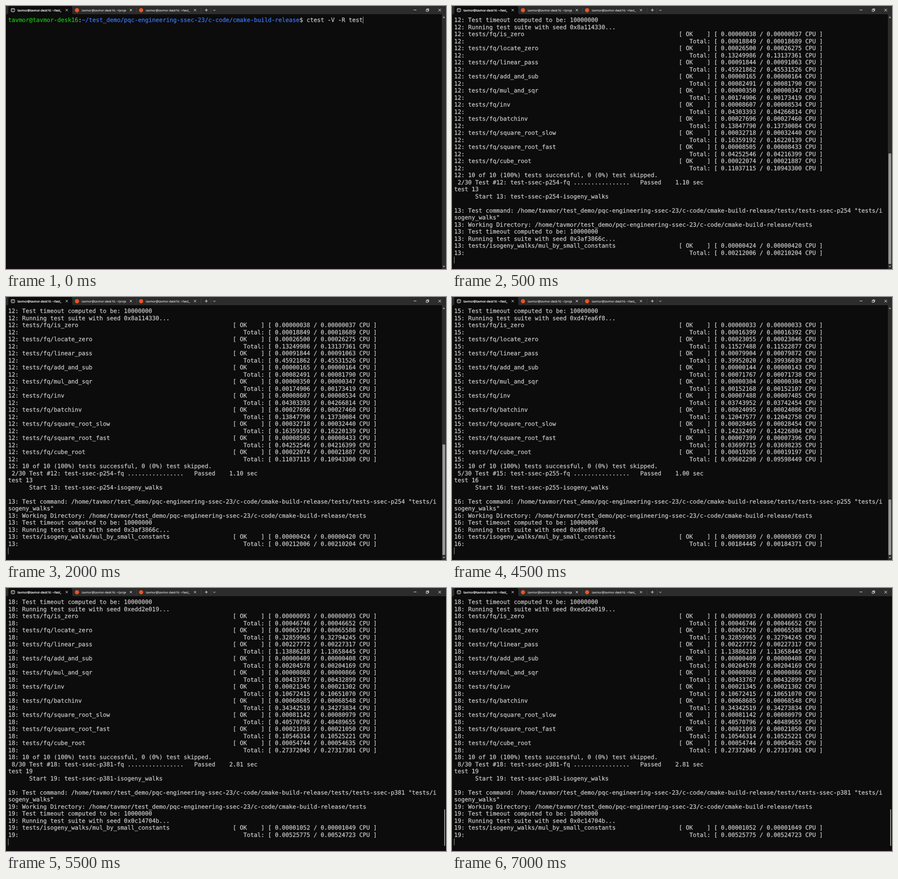
Recreate the animation shown at these times as an HTML page. Size 969 by 578 pixels, loop 8 s.

```html
<!DOCTYPE html>
<html lang="en">
<head>
<meta charset="utf-8">
<title>Terminal test run</title>
<style>
  html, body { margin: 0; width: 100%; height: 100%; overflow: hidden; background: #0c0c0c; }
  svg { position: absolute; left: 0; top: 0; }
  pre {
    position: absolute; left: 4.7px; top: 24px; margin: 0; color: #ccc;
    font: 12.855px/15.5px "DejaVu Sans Mono", monospace;
    text-rendering: geometricPrecision; font-variant-ligatures: none;
    -webkit-text-stroke: .25px;
  }
  .user { color: #16c60c; }
  .path { color: #3b78ff; }
  .label {
    position: absolute; top: 4px; width: 97px; overflow: hidden; white-space: nowrap;
    font: 6.5px/11px "Open Sans", sans-serif; color: #f2f2f2;
    text-rendering: geometricPrecision; -webkit-text-stroke: .1px;
  }
  .label.active { color: #fff; -webkit-text-stroke: .25px; }
  .line { fill: none; stroke: #f0f0f0; }
</style>
</head>
<body>
<svg width="969" height="578" viewBox="0 0 969 578">
  <rect width="969" height="18" fill="#2c2c2c"/>
  <path d="M2 18Q5 18 5 15V4Q5 0 9 0H142Q146 0 146 4V15Q146 18 149 18Z" fill="#0c0c0c"/>
  <rect y="575" width="969" height="3" fill="#130a10"/>
  <path d="M287.5 3V15M429.5 3V15M451.5 3V15" stroke="#414141"/>
  <rect x="11.4" y="5.4" width="7.6" height="7.4" rx="1.6" class="line"/>
  <path d="M11.5 7.3H19M13 9l1.4 1.1L13 11.2M15.6 11h2" class="line" stroke-width=".7"/>
  <circle cx="156.3" cy="9.3" r="4.6" fill="#e95420"/>
  <circle cx="297.5" cy="9.3" r="4.6" fill="#e95420"/>
  <path id="icons" class="line"/>
  <g id="scrollbar">
    <rect x="960" y="18" width="9" height="560" fill="#2c2c2c"/>
    <path d="M961.6 26.3L964.3 22.4L967 26.3ZM961.6 571L964.3 574.8L967 571Z" fill="#9a9a9a"/>
  </g>
  <rect id="thumb" rx="1.5" fill="#9a9a9a"/>
  <rect id="cursor" width="1" height="15" fill="#a8a8a8"/>
</svg>
<pre id="screen"></pre>
<script>
const $ = id => document.getElementById(id);
const user = 'tavmor', host = `${user}-desk16`;
const project = 'test_demo/pqc-engineering-ssec-23/c-code/cmake-build-release';
const repeats = 500;

// Seconds for all repeats of each test on the smallest prime.
const fieldTests = {
  is_zero: .00018849, locate_zero: .13249986, linear_pass: .45921862, add_and_sub: .00082491,
  mul_and_sqr: .00174906, inv: .04303393, batchinv: .1384779, square_root_slow: .16359192,
  square_root_fast: .04252546, cube_root: .11037115
};
const walkTime = .00212006;

// Times scale with the prime; cpu is the share of wall time spent on the processor.
const runs = [
  { start: 500, id: 12, prime: 'p254', scale: 1, cpu: .9915, secs: '1.10',
    seeds: ['8a114330', '3af3866c'], thumb: 324 },
  { start: 3000, id: 15, prime: 'p255', scale: .87, cpu: .9996, secs: '1.00',
    seeds: ['d47ea6f8', 'd0efdfc8'], thumb: 445 },
  { start: 5500, id: 18, prime: 'p381', scale: 2.48, cpu: .998, secs: '2.81',
    seeds: ['edd2e019', '0c14704b'], thumb: 486, slim: true }
];

function result(id, name, time, { scale, cpu }) {
  const wall = time * scale;
  const timing = count => `[ ${(wall / count).toFixed(8)} / ${(wall * cpu / count).toFixed(8)} CPU ]`;
  return [`${id}: tests/${name}`.padEnd(64) + `[ OK    ] ${timing(repeats)}`,
    `${id}:`.padEnd(67) + `Total: ${timing(1)}`];
}

const heading = (id, seed) => [`${id}: Test timeout computed to be: 10000000`,
  `${id}: Running test suite with seed 0x${seed}...`];

function report(run) {
  const { id, prime, secs, seeds } = run;
  const next = id + 1, dir = `/home/${user}/${project}/tests`;
  const command = `${next}: Test command: ${dir}/tests-ssec-${prime} "tests/isogeny_walks"`;
  return [
    ...heading(id, seeds[0]),
    ...Object.entries(fieldTests).flatMap(([name, time]) => result(id, `fq/${name}`, time, run)),
    `${id}: 10 of 10 (100%) tests successful, 0 (0%) test skipped.`,
    ` ${id - 10}/30 Test #${id}: test-ssec-${prime}-fq ${'.'.repeat(16)}   Passed    ${secs} sec`,
    `test ${next}`,
    `      Start ${next}: test-ssec-${prime}-isogeny_walks`,
    '',
    command.slice(0, 122), command.slice(122),
    `${next}: Working Directory: ${dir}`,
    ...heading(next, seeds[1]),
    ...result(next, 'isogeny_walks/mul_by_small_constants', walkTime, run)
  ].join('\n');
}

const prompt = `<span class="user">${user}@${host}</span>:<span class="path">~/${project}</span>` +
  '$ ctest -V -R test';

function setRect(el, box) {
  for (const key in box) el.setAttribute(key, box[key]);
}

function show(run) {
  $('screen').innerHTML = run ? report(run) : prompt;
  setRect($('cursor'), run ? { x: 4.5, y: 550.5 } : { x: 786, y: 23.5 });
  setRect($('thumb'), !run ? { width: 0, height: 0 } : {
    x: run.slim ? 965 : 961.2, width: run.slim ? 2 : 6, y: run.thumb, height: 567 - run.thumb });
  $('scrollbar').style.display = run?.slim ? 'none' : '';
}

['test_demo', 'projects', 'test_demo'].forEach((folder, i) => {
  const label = document.createElement('div');
  label.className = i ? 'label' : 'label active';
  label.style.left = 25.3 + 141.3 * i + 'px';
  label.textContent = `${user}@${host}: ~/${folder}`;
  document.body.append(label);
});

const cross = (x, r) => `M${x - r} ${9 - r}l${2 * r} ${2 * r}m0 ${-2 * r}l${-2 * r} ${2 * r}`;
$('icons').setAttribute('d', [133.7, 275, 416.3].map(x => cross(x, 2.4)).join('') + cross(955.2, 2.9) +
  'M438 9h6.4M441.2 5.8v6.4M456.4 8.2l2.4 2.2l2.4-2.2M897.8 8.7h6' +
  'M925.3 7.6h4.2v4.2h-4.2ZM926.8 7.4v-1.2h4.2v4.2h-1.3');

let shown;
function tick(now) {
  const time = now % 8000;
  const run = runs.findLast(r => time >= r.start) ?? null;
  if (run !== shown) show(shown = run);
  requestAnimationFrame(tick);
}
tick(performance.now());
</script>
</body>
</html>
```
